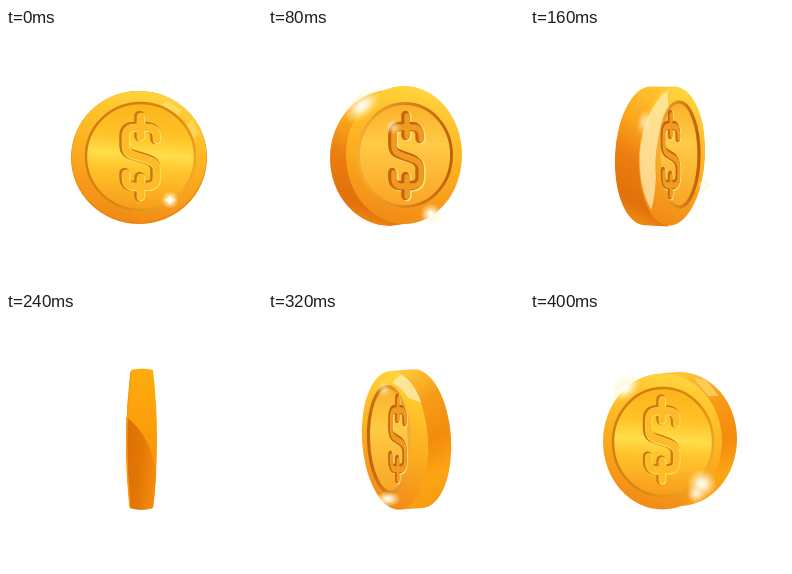
Write an HTML page that moves like this. It is 256 by 256 pixels and loops after 0.48 s.

```html
<!DOCTYPE html>
<html lang="en">
<head>
<meta charset="utf-8">
<title>Spinning coin</title>
<style>
  html, body { margin: 0; width: 100%; height: 100%; overflow: hidden; background: #fff; }
  svg { display: block; width: 100vw; height: 100vh; }
  .pose {
    visibility: hidden;
    animation: show 480ms step-end infinite;
    animation-delay: calc((var(--i) - 6) * 80ms);
  }
  @keyframes show {
    0% { visibility: visible; }
    16.6667%, 100% { visibility: hidden; }
  }
  .rim { fill: url(#rim); }
  .dish { fill: url(#dish); stroke: url(#groove); stroke-width: 2.4; }
  .sign { fill: none; stroke-linecap: round; stroke-linejoin: round; }
  .glint { fill: url(#glint); }
</style>
</head>
<body>
<svg viewBox="0 0 256 256">
  <defs>
    <linearGradient id="rim" x1=".6" y1="0" x2=".36" y2="1">
      <stop offset="0" stop-color="#ffd53e"/>
      <stop offset=".2" stop-color="#ffc52e"/>
      <stop offset=".5" stop-color="#fcb01f"/>
      <stop offset=".8" stop-color="#f6981a"/>
      <stop offset="1" stop-color="#f08a16"/>
    </linearGradient>
    <linearGradient id="dish" x1=".53" y1="0" x2=".47" y2="1">
      <stop offset="0" stop-color="#fcb31d"/>
      <stop offset=".3" stop-color="#ffc226"/>
      <stop offset=".48" stop-color="#ffdd4a"/>
      <stop offset=".62" stop-color="#ffc52c"/>
      <stop offset="1" stop-color="#f79b1a"/>
    </linearGradient>
    <linearGradient id="warm" x1=".5" y1="0" x2=".5" y2="1">
      <stop offset="0" stop-color="#fbb02a"/>
      <stop offset=".4" stop-color="#ffca45"/>
      <stop offset="1" stop-color="#f9a423"/>
    </linearGradient>
    <linearGradient id="groove" x1="0" y1=".2" x2="1" y2=".8">
      <stop offset="0" stop-color="#cf7a0c"/>
      <stop offset=".6" stop-color="#dd8a10"/>
      <stop offset="1" stop-color="#f3ae2a"/>
    </linearGradient>
    <linearGradient id="right">
      <stop offset="0" stop-color="#f6ac30"/>
      <stop offset="1" stop-color="#bd5f0c"/>
    </linearGradient>
    <linearGradient id="left">
      <stop offset="0" stop-color="#c0640d"/>
      <stop offset="1" stop-color="#f6ac30"/>
    </linearGradient>
    <linearGradient id="edgeL" x1=".6" y1="0" x2=".4" y2="1">
      <stop offset="0" stop-color="#ffc431"/>
      <stop offset=".3" stop-color="#fba61c"/>
      <stop offset=".55" stop-color="#ec7f10"/>
      <stop offset=".85" stop-color="#e2700c"/>
      <stop offset="1" stop-color="#f09012"/>
    </linearGradient>
    <linearGradient id="edgeR" x1=".4" y1="0" x2=".6" y2="1">
      <stop offset="0" stop-color="#ffc336"/>
      <stop offset=".25" stop-color="#f79c18"/>
      <stop offset=".55" stop-color="#f48b0c"/>
      <stop offset=".8" stop-color="#fca514"/>
      <stop offset="1" stop-color="#f59a12"/>
    </linearGradient>
    <linearGradient id="side" x1=".5" y1="0" x2=".5" y2="1">
      <stop offset="0" stop-color="#ffad0e"/>
      <stop offset=".5" stop-color="#fb9a0a"/>
      <stop offset="1" stop-color="#f08a0a"/>
    </linearGradient>
    <linearGradient id="shade" x1="0" y1=".4" x2="1" y2=".6">
      <stop offset="0" stop-color="#dd7006"/>
      <stop offset=".45" stop-color="#e27606"/>
      <stop offset="1" stop-color="#f58d09"/>
    </linearGradient>
    <radialGradient id="glint">
      <stop offset="0" stop-color="#fff"/>
      <stop offset=".3" stop-color="#fffbe6" stop-opacity=".85"/>
      <stop offset="1" stop-color="#ffe9a0" stop-opacity="0"/>
    </radialGradient>
    <path id="s" d="M16-17V-20Q16-29 6-29H-6Q-15-29-15-20V-11Q-15-3-6-1L7 3Q16 6 16 13V21Q16 30 6 30H-6Q-15 30-15 21V17M0-40V-20M0 21V40"/>
    <g id="dollar" class="sign">
      <use href="#s" x="-.5" stroke="#c9780e" stroke-width="10.5"/>
      <use href="#s" x="1" y="1" stroke="#ffdf62" stroke-width="8.5"/>
      <use href="#s" x=".6" y=".4" stroke="#fdbb28" stroke-width="7"/>
    </g>
    <g id="deep" class="sign">
      <use href="#s" x="1.4" y="1" stroke="#ffdf7a" stroke-width="10"/>
      <use href="#s" x="-.6" stroke="#c2650c" stroke-width="9.5"/>
      <use href="#s" x="1.2" y=".8" stroke="#f19a20" stroke-width="6"/>
    </g>
  </defs>

  <!-- facing front -->
  <g class="pose" style="--i:0">
    <ellipse cx="133" cy="129.500" rx="68" ry="66.500" fill="#ec860f"/>
    <ellipse class="rim" cx="133" cy="128.500" rx="67.500" ry="65.500"/>
    <path d="M160 73L176 82L167 92L153 80ZM186 92L194 106L187 110L179 99Z" fill="#ffe680" opacity=".5"/>
    <ellipse class="dish" cx="134.500" cy="128.500" rx="54.500" ry="53.500"/>
    <use href="#dollar" transform="translate(134 128)"/>
    <circle class="glint" cx="164" cy="172" r="9"/>
    <path d="M164 166L165 171L171 172L165 173L164 178L163 173L157 172L163 171Z" fill="#fff"/>
  </g>

  <!-- turning right -->
  <g class="pose" style="--i:1">
    <path d="M122 62A60 68 0 0 0 122 198L136 196V58Z" fill="url(#edgeL)"/>
    <ellipse class="rim" cx="136" cy="127" rx="58" ry="69"/>
    <ellipse cx="137" cy="127" rx="46.500" ry="51.500" fill="url(#warm)" stroke="url(#right)" stroke-width="2.800"/>
    <use href="#deep" transform="translate(138 127.500) scale(.88 1)"/>
    <ellipse class="glint" cx="94" cy="78" rx="22" ry="12" transform="rotate(-38 94 78)"/>
    <circle class="glint" cx="125" cy="99" r="8" opacity=".6"/>
    <circle class="glint" cx="163" cy="186" r="11"/>
  </g>

  <g class="pose" style="--i:2">
    <g transform="rotate(3 130 128)">
      <path d="M118 59A33 69.500 0 0 0 118 198H142V58Z" fill="url(#edgeL)"/>
      <ellipse class="rim" cx="142" cy="127.500" rx="33" ry="69.500"/>
      <path d="M134 62Q112 82 109.500 125Q110 160 124 182Q127 172 127 150Q122 115 136 80Z" fill="#ffedb4" opacity=".75"/>
    </g>
    <ellipse cx="149" cy="126.500" rx="20" ry="52.500" fill="url(#warm)" stroke="url(#right)" stroke-width="3.200"/>
    <use href="#deep" transform="translate(140.500 126.500) scale(.48 1)"/>
    <ellipse class="glint" cx="114" cy="94" rx="7" ry="14" transform="rotate(14 114 94)" opacity=".6"/>
    <circle class="glint" cx="174" cy="157" r="6"/>
  </g>

  <!-- edge on -->
  <g class="pose" style="--i:3">
    <path d="M125 58Q136 55.500 147 58Q155 128 147 196Q135 199.500 124 196Q116 128 125 58Z" fill="url(#side)"/>
    <path d="M120.500 105C130 113 145 126 150 162Q149 182 147 196Q135 199.500 124 196Q119 148 120.500 105Z" fill="url(#shade)"/>
    <path d="M125 60Q117 128 124 195" fill="none" stroke="#f99a10" stroke-width="1.500"/>
  </g>

  <!-- turning back -->
  <g class="pose" style="--i:4">
    <g transform="rotate(-4 138 127)">
      <path d="M127 58H150A33 69.500 0 0 1 150 197H127Z" fill="url(#edgeR)"/>
      <ellipse class="rim" cx="127" cy="127.500" rx="33" ry="69.500"/>
      <path d="M137 62Q150 70 156 92L143 86Q138 76 128 70Z" fill="#fff0bd" opacity=".7"/>
    </g>
    <ellipse cx="121" cy="127.500" rx="20.500" ry="53" fill="url(#warm)" stroke="url(#left)" stroke-width="3.200" transform="rotate(-2 121 127.500)"/>
    <use href="#deep" transform="translate(129.500 126.500) scale(.46 1)"/>
    <ellipse class="glint" cx="116" cy="77" rx="7" ry="9" opacity=".5"/>
    <ellipse class="glint" cx="120" cy="187" rx="13" ry="8"/>
  </g>

  <g class="pose" style="--i:5">
    <path d="M132 61L149 60A58 67 0 0 1 149 194L132 197Z" fill="url(#edgeR)"/>
    <path d="M164 66L176 68L189 84L178 84Z" fill="#ffe17c" opacity=".6"/>
    <ellipse class="rim" cx="132.500" cy="129.500" rx="59.500" ry="68"/>
    <ellipse class="dish" cx="133" cy="130" rx="50" ry="54"/>
    <use href="#dollar" transform="translate(131.500 127.500) scale(.9 1)"/>
    <ellipse class="glint" cx="96" cy="76" rx="17" ry="11" transform="rotate(-40 96 76)"/>
    <circle class="glint" cx="172" cy="172" r="15"/>
    <circle class="glint" cx="166" cy="182" r="10" opacity=".8"/>
  </g>
</svg>
</body>
</html>
```
